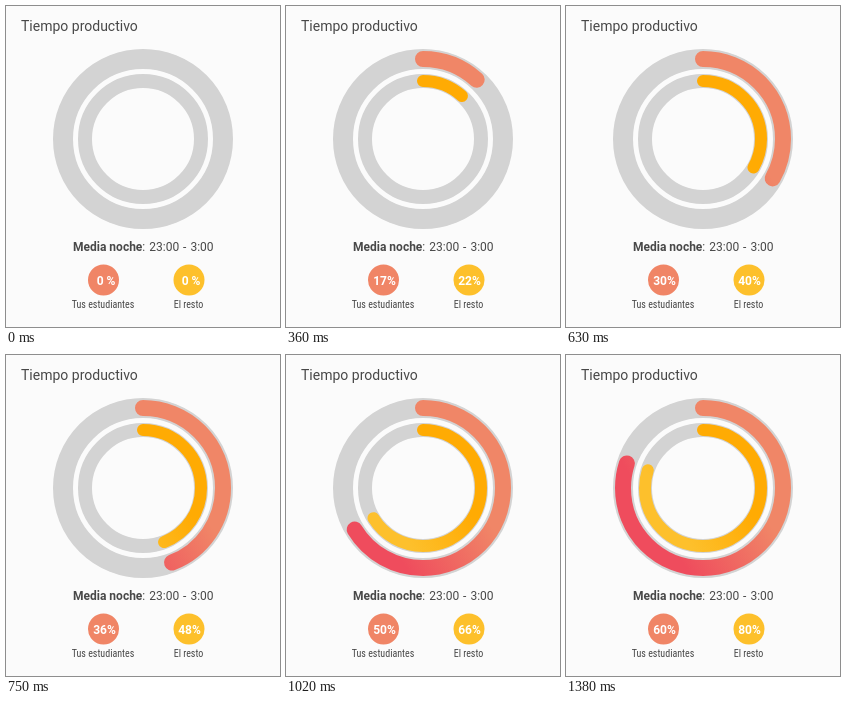
An HTML page that plays this animation: 274 by 321 pixels, repeating every 2130 ms.

```html
<!DOCTYPE html>
<html lang="es">
<head>
<meta charset="utf-8">
<title>Tiempo productivo</title>
<style>
  html, body { margin: 0; width: 100%; height: 100%; overflow: hidden; background: #fbfbfb; }
  svg { display: block; width: 274px; height: 321px; font: 12px Roboto, sans-serif; fill: #484848; }
  .title { font-size: 14px; }
  .hours { word-spacing: 1px; }
  .label { font: 10px 'Roboto Condensed', Roboto, sans-serif; font-stretch: condensed; text-anchor: middle; }
  .value { font-weight: 700; fill: #fff; text-anchor: middle; }
  .track, .arc { fill: none; }
  .track { stroke: #d3d3d3; }
  .arc { stroke-linecap: round; }
</style>
</head>
<body>
<svg viewBox="0 0 274 321">
  <defs>
    <linearGradient id="red" gradientUnits="userSpaceOnUse" x1="170" y1="113" x2="89" y2="162">
      <stop stop-color="#f08667"/><stop offset="1" stop-color="#ef4c5d"/>
    </linearGradient>
    <linearGradient id="amber" gradientUnits="userSpaceOnUse" x1="161" y1="119" x2="102" y2="154">
      <stop stop-color="#ffab03"/><stop offset="1" stop-color="#fdc02c"/>
    </linearGradient>
  </defs>
  <text class="title" x="15" y="25">Tiempo productivo</text>

  <circle class="track" cx="137" cy="133" r="80" stroke-width="20"/>
  <circle class="track" cx="137" cy="133" r="58" stroke-width="14"/>
  <path class="arc" pathLength="360" stroke="url(#red)" stroke-width="16" d="M137 53a80 80 0 0 1 0 160a80 80 0 0 1 0-160"/>
  <path class="arc" pathLength="360" stroke="url(#amber)" stroke-width="12" d="M137 75a58 58 0 0 1 0 116a58 58 0 0 1 0-116"/>

  <text x="67" y="245"><tspan font-weight="700">Media noche</tspan><tspan class="hours">: 23:00 - 3:00</tspan></text>

  <circle cx="97.5" cy="274" r="15.5" fill="#f08566"/>
  <circle cx="183" cy="274" r="15.5" fill="#fdc02b"/>
  <text class="value" y="278.5"></text>
  <text class="value" y="278.5"></text>
  <text class="label" x="97" y="302">Tus estudiantes</text>
  <text class="label" x="182.5" y="302">El resto</text>
</svg>
<script>
  const LOOP = 2130, STEP = 30, LAST = 45, COUNT_STEPS = 40, SWEEP = 288;
  const arcs = document.querySelectorAll('.arc');
  const [students, others] = document.querySelectorAll('.value');
  const start = performance.now();

  function showPercent(el, x, goal, progress) {
    const n = Math.round(goal * progress);
    el.textContent = n < 10 ? n + ' %' : n + '%';
    el.setAttribute('x', n < 10 ? x + 1.5 : x);
  }

  function draw() {
    const time = (performance.now() - start) % LOOP;
    const step = Math.min(LAST, Math.max(0, Math.floor(time / STEP) - 1));
    const eased = (1 - Math.cos(Math.PI * (step + 0.5) / (LAST + 1))) / 2;
    for (const arc of arcs) {
      arc.style.visibility = step ? 'visible' : 'hidden';
      arc.setAttribute('stroke-dasharray', `${SWEEP * eased} 400`);
    }
    const counted = Math.min(1, step / COUNT_STEPS);
    showPercent(students, 98.5, 60, counted);
    showPercent(others, 183.5, 80, counted);
    requestAnimationFrame(draw);
  }
  draw();
</script>
</body>
</html>
```
